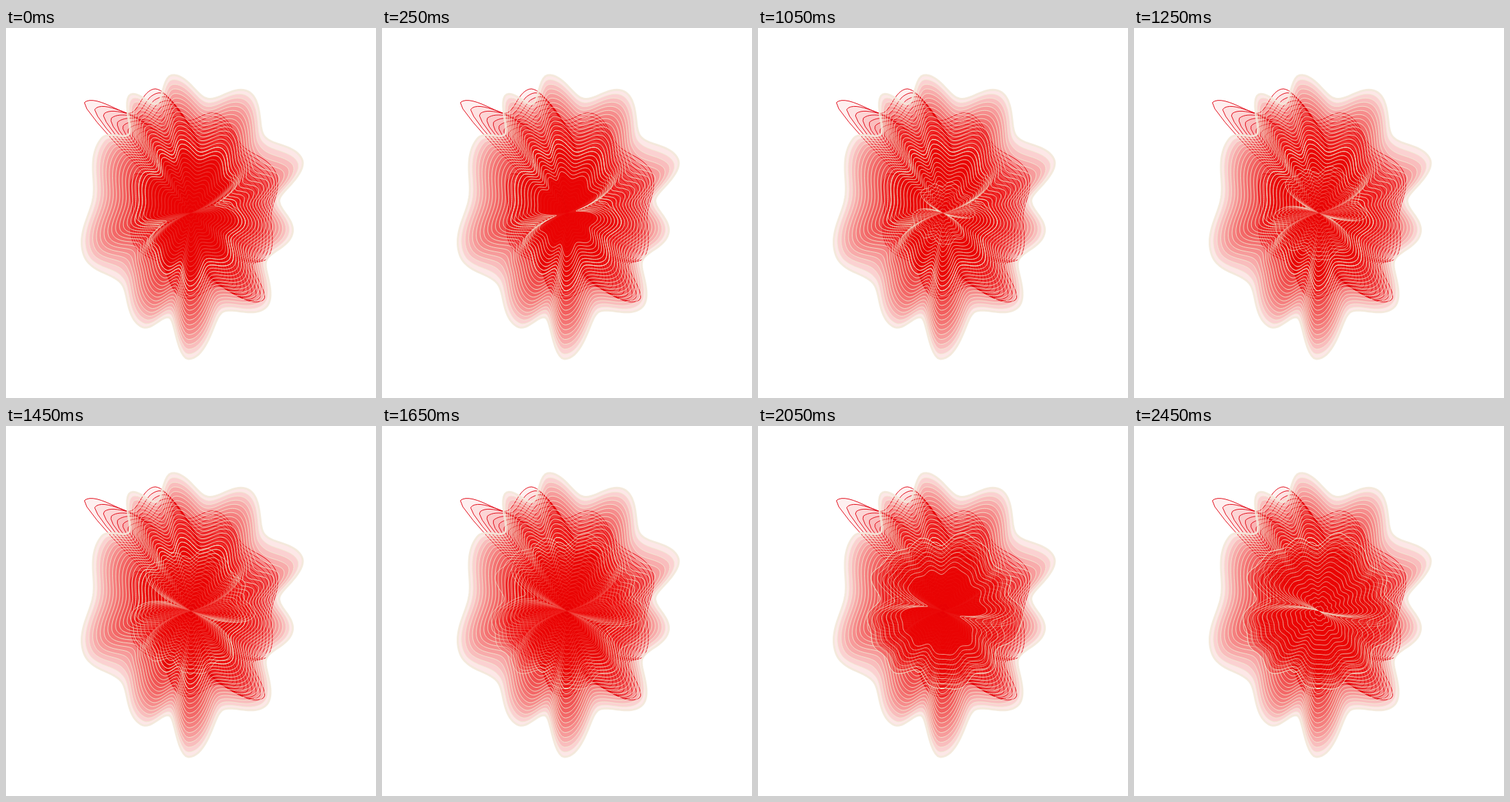
Animation, 540 px wide and 540 px high, one loop 2500 ms. Source, as an HTML page with a canvas:

```html
<!DOCTYPE html>
<html lang="en">
<head>
<meta charset="utf-8">
<title>Red bloom</title>
<style>
  html, body { margin: 0; width: 100%; height: 100%; overflow: hidden; background: #fff; }
  canvas { display: block; width: 540px; height: 540px; }
</style>
</head>
<body>
<canvas id="stage" width="540" height="540"></canvas>
<script>
const ctx = document.getElementById('stage').getContext('2d');
const LOOP = 2500, STEP = 50, RINGS = 30, DEG = Math.PI / 180;
const CREAM = 'rgba(240,236,212,0.85)', RED = 'rgba(225,0,15,0.95)';

// Radius by angle: waves through the given tips, with a valley halfway between neighbours.
function lobes(tips, dip) {
  return deg => {
    const turn = 360 * Math.floor((deg - tips[0][0]) / 360);
    deg -= turn;
    const i = tips.findLastIndex(tip => tip[0] <= deg);
    const [a, p] = tips[i];
    const [b, q] = tips[i + 1] || [tips[0][0] + 360, tips[0][1]];
    const x = (deg - a) / (b - a);
    const valley = dip * Math.min(p, q), tip = x < 0.5 ? p : q;
    return valley + (tip - valley) * (1 + Math.cos(2 * Math.PI * x)) / 2;
  };
}

const petals = lobes([
  [-140, 170], [-117, 194], [-98, 203], [-65, 196], [-26, 180],
  [11, 151], [52, 176], [91, 213], [113, 181], [158, 168]
], 0.86);
const spikes = lobes([
  [-146, 100], [-134, 224], [-107, 189], [-76, 150], [-26, 137],
  [30, 130], [50, 165], [93, 125], [150, 95]
], 0.9);
const core = deg => 108 + 6 * Math.sin(5 * deg * DEG + 1)
  + 5 * Math.sin(9 * deg * DEG) + 4 * Math.sin(14 * deg * DEG + 2);

function outline(radius) {
  const path = new Path2D();
  for (let deg = 0; deg < 360; deg++) {
    const r = radius(deg);
    path.lineTo(270 + r * Math.cos(deg * DEG), 270 + r * Math.sin(deg * DEG));
  }
  path.closePath();
  return path;
}

// Scaled ring with two opposite notches that deepen towards the middle.
function notched(shape, size, seamIn, seamOut, power) {
  const seam = seamIn + (seamOut - seamIn) * size;
  const depth = 0.97 * (1 - size) ** power;
  return outline(deg => {
    const turns = (deg * DEG - seam) / Math.PI;
    const off = (turns - Math.round(turns)) * Math.PI;
    return size * shape(deg) * (1 - depth * Math.exp(-((off / 0.17) ** 2)));
  });
}

// Twisting ring whose longest tip shortens first.
function spiked(k) {
  return outline(deg => {
    const r = spikes(deg - 1.3 * k), body = Math.min(r, 185);
    return (1 - k / RINGS) * (body + (r - body) * Math.exp(-0.3 * k));
  });
}

function paint(path, alpha, stroke, width) {
  ctx.fillStyle = `rgba(230,0,5,${alpha})`;
  ctx.fill(path);
  ctx.strokeStyle = stroke;
  ctx.lineWidth = width;
  ctx.stroke(path);
}

const list = (n, make) => Array.from({ length: n }, (_, i) => make(i));
// Rings from the middle outwards; `whole` is the ring number of full size.
const pass = (n, whole, shape, ...seam) =>
  list(n, i => notched(shape, (i + 1) / whole, ...seam));

const spiky = list(RINGS, spiked);
const outer = pass(RINGS, RINGS, petals, -0.2, -0.65, 1).reverse();
const grown = pass(16, RINGS, petals, -0.2, -0.65, 1);
const closing = pass(16, RINGS, petals, -0.05, -0.65, 1).reverse();
const growing = pass(20, 20, core, 0.42, 0.4, 0.3);
const settling = pass(16, 16, core, 0.45, 0.2, 0.6).reverse();

function paintPass(rings, count, alpha) {
  rings.slice(0, Math.max(0, count)).forEach(ring => paint(ring, alpha, CREAM, 0.8));
}

function draw(step) {
  ctx.fillStyle = '#fff';
  ctx.fillRect(0, 0, 540, 540);
  spiky.forEach(ring => paint(ring, 0.06, RED, 1));
  outer.forEach((ring, k) => paint(ring, 0.095, k ? CREAM : 'rgba(243,232,218,0.9)', k ? 1 : 3));
  paintPass(grown, grown.length, 0.12);
  paintPass(closing, step + 3, 0.16);
  paintPass(growing, step - 13, 0.1);
  paintPass(settling, step - 33, 0.16);
}

let shown = -1;
function tick() {
  const step = Math.floor(performance.now() % LOOP / STEP);
  if (step !== shown) draw(shown = step);
  requestAnimationFrame(tick);
}
tick();
</script>
</body>
</html>
```
